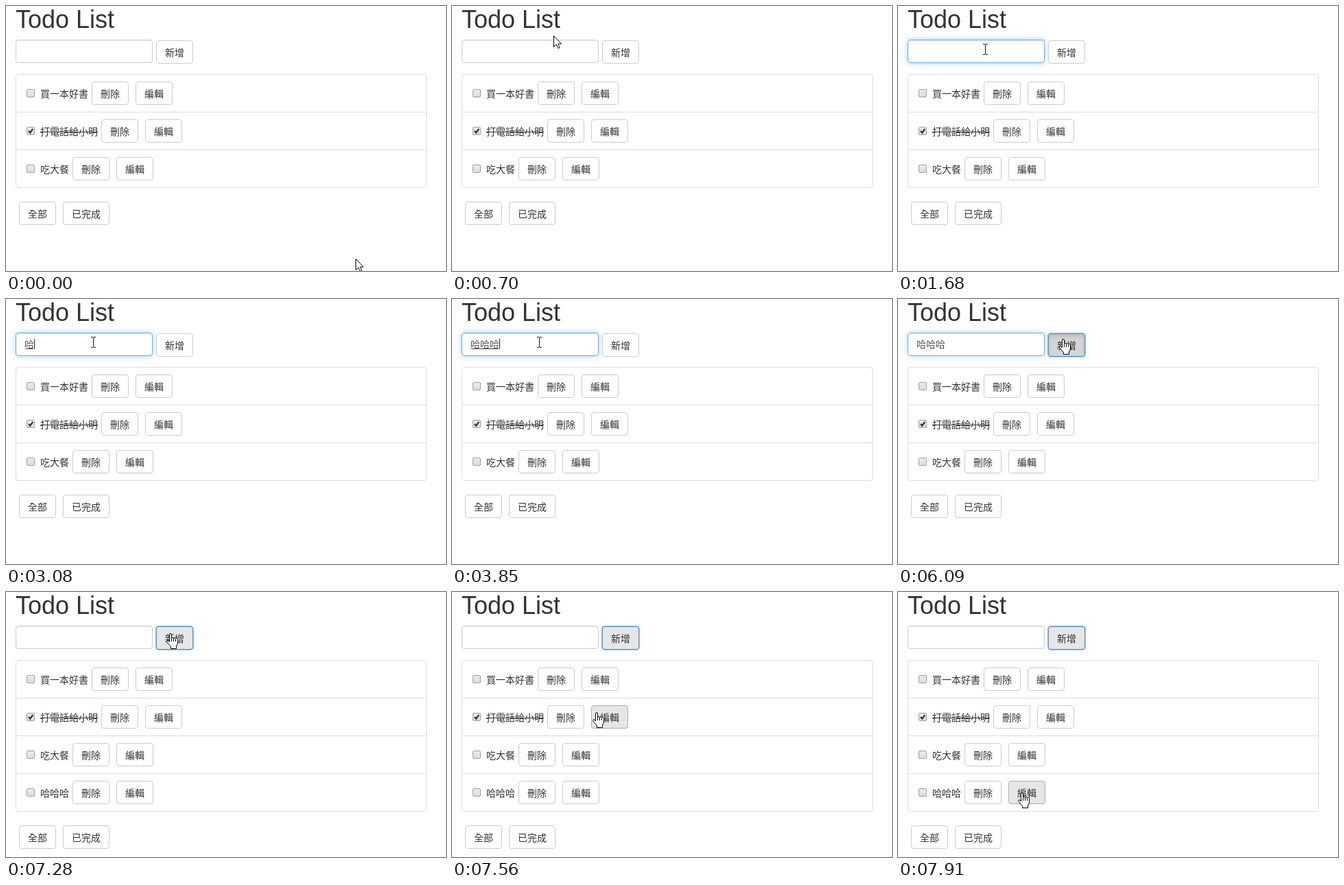
Recreate the animation shown at these times as an HTML page. Size 642x386 px, loop 8000 ms.

```html
<!DOCTYPE html>
<html lang="zh-Hant">
<head>
<meta charset="utf-8">
<title>Todo List</title>
<style>
* { box-sizing: border-box; }
html, body { margin: 0; width: 100%; height: 100%; overflow: hidden; background: #fff; }
body { position: relative; color: #333; font: 300 14px/20px "Noto Sans CJK TC", "Noto Sans CJK", "Noto Sans CJK JP", sans-serif; }
body *, body svg { position: absolute; white-space: nowrap; }
svg * { position: static; }
h1 { left: 14px; top: -1px; margin: 0; font: 36px/41px "Liberation Sans", Arial, sans-serif; }
.field { left: 14px; top: 49px; width: 200px; height: 34px; border: 1px solid #ccc; border-radius: 4px; background: #fff; }
.typed { left: 27px; top: 55px; color: #555; }
.underline { left: 28px; top: 72px; height: 1px; background: #444; }
.caret { top: 58px; width: 1px; height: 15px; background: #222; }
.reading { top: 73px; width: 19px; height: 53px; padding: 1px 2px; border: 1px solid #888; background: #fff; color: #222; line-height: 16px; white-space: pre-line; }
.btn { height: 34px; padding: 6px 12px; border: 1px solid #ccc; border-radius: 4px; background: #fff; }
.hover { background: #e6e6e6; border-color: #adadad; }
.focus { background: #e6e6e6; border-color: #5f94d6; box-shadow: 0 0 0 1px rgba(94, 150, 225, .65); }
.press { background: #d4d4d4; box-shadow: 0 0 0 1px rgba(94, 150, 225, .65), inset 0 3px 5px rgba(0, 0, 0, .125); }
.list { left: 14px; top: 99px; width: 600px; border: 1px solid #ddd; border-radius: 4px; }
.rule { left: 14px; width: 600px; height: 1px; background: #ddd; }
.check { left: 30px; width: 12px; height: 12px; border: 1px solid #a39ca1; border-radius: 2px; background: linear-gradient(#ececec, #dcdcdc); }
.check svg { left: -1px; top: -1px; }
.label { left: 50px; }
.done::after { content: ""; position: absolute; left: 0; right: 0; top: 11px; height: 1px; background: #333; }
.pointer { left: 0; top: 0; overflow: visible; }
.pointer path { fill: #fff; stroke: #000; stroke-linejoin: round; }
#beam path { fill: none; stroke: #111; }
</style>
</head>
<body>
<h1>Todo List</h1>
<div class="field"></div>
<div class="typed"></div>
<div class="underline"></div>
<div class="caret"></div>
<div class="list"></div>
<div class="reading"></div>

<svg class="pointer" id="arrow" width="12" height="20"><path d="M.5 .5V16.5L4.2 13L6.8 18.6L9.2 17.6L6.7 12.1H11.6Z"/></svg>
<svg class="pointer" id="beam" width="7" height="16"><path d="M0 .5H3M4 .5H7M3.5 1V15M0 15.5H3M4 15.5H7"/></svg>
<svg class="pointer" id="hand" width="18" height="23"><path d="M4.5 13V2a1.5 1.5 0 0 1 3 0V7.5a1.5 1.3 0 0 1 3 .3a1.5 1.3 0 0 1 3 .7a1.5 1.3 0 0 1 3 1V15L14.5 19V22.5H6.5V19.5L1 13.3a1.5 1.5 0 0 1 2-2.2Z"/><path d="M7.5 7.5V12M10.5 8V12M13.5 9V12"/></svg>

<script>
const LOOP = 8000, STEP = 70;
const $ = s => document.querySelector(s);
const field = $('.field'), typed = $('.typed'), underline = $('.underline');
const caret = $('.caret'), list = $('.list'), reading = $('.reading');
const pointers = { arrow: [0, 0], beam: [3, 8], hand: [6, 0] };
const buttons = [];

function add(cls, x, y, text = '') {
  const el = document.createElement('div');
  el.className = cls;
  if (x !== null) el.style.left = x + 'px';
  el.style.top = y + 'px';
  el.textContent = text;
  document.body.insertBefore(el, reading);
  return el;
}

function button(x, y, text) {
  const b = { el: add('btn', x, y, text), x, y, w: 26 + 14 * text.length };
  b.el.style.width = b.w + 'px';
  buttons.push(b);
  return b;
}

function addRow(text, i, done) {
  const y = 99 + 55 * i, x = 55 + 14 * text.length;
  const box = add('check', null, y + 22);
  if (done) box.innerHTML = '<svg width="12" height="12"><path d="M3 6L5.2 8.6L9.2 3" fill="none" stroke="#333" stroke-width="2.2"/></svg>';
  const parts = [box, add(done ? 'label done' : 'label', null, y + 18, text)];
  if (i) parts.push(add('rule', null, y));
  const pair = [button(x, y + 11, '刪除'), button(x + 64, y + 11, '編輯')];
  return { parts: parts.concat(pair.map(b => b.el)), pair };
}

const submit = button(219, 50, '新增');
addRow('買一本好書', 0);
addRow('打電話給小明', 1, true);
addRow('吃大餐', 2);
const extra = addRow('哈哈哈', 3);
const filters = [button(19, 285, '全部'), button(83, 285, '已完成')];

// pointer path: time, x, y
const path = [
  [0, 510, 368], [770, 145, 41], [840, 138, 52], [1050, 127, 63],
  [4830, 127, 63], [4900, 128, 63], [5180, 128, 63], [5250, 134, 63],
  [5320, 168, 59], [5390, 212, 58], [5460, 241, 58], [7210, 241, 58], [7910, 181, 292]
];
// each syllable: first key, second key, reading closed, character set
const syllables = [[2730, 2800, 3010, 3080], [3220, 3290, 3430, 3500], [3640, 3710, 3850, 3850]];
const caretFlips = [1190, 1680, 2100, 2590, 2730, 4760, 5250, 5670];
const PRESS = 6090, ADDED = 6230;

const clamp = v => Math.max(0, Math.min(1, v));
const ease = p => p < .5 ? Math.pow(2 * p, 2.5) / 2 : 1 - Math.pow(2 - 2 * p, 2.5) / 2;
const smooth = p => p * p * (3 - 2 * p);
const show = (el, on) => { el.style.visibility = on ? 'visible' : 'hidden'; };

function pointerAt(t) {
  const i = path.findIndex(k => k[0] > t);
  if (i < 0) return path[path.length - 1].slice(1);
  const [t0, x0, y0] = path[i - 1], [t1, x1, y1] = path[i];
  const p = ease((t - t0) / (t1 - t0));
  return [Math.round(x0 + (x1 - x0) * p), Math.round(y0 + (y1 - y0) * p)];
}

const inside = (x, y, b, h = 34) => x >= b.x && x < b.x + b.w && y >= b.y && y < b.y + h;

function drawField(t) {
  const glow = t < PRESS ? smooth(clamp((t - 1170) / 150)) : 1 - smooth(clamp((t - 6060) / 150));
  const mix = (a, b) => Math.round(a + (b - a) * glow);
  field.style.borderColor = `rgb(${mix(204, 102)},${mix(204, 175)},${mix(204, 233)})`;
  field.style.boxShadow = `inset 0 1px 1px rgba(0,0,0,.075), 0 0 8px rgba(102,175,233,${.6 * glow})`;

  const n = syllables.filter(s => t >= s[3]).length;
  typed.textContent = t < ADDED ? '哈'.repeat(n) : '';
  underline.style.width = Math.max(0, 14 * n - 2) + 'px';
  show(underline, n && t < 4270);
  caret.style.left = 27 + 14 * n + 'px';
  show(caret, caretFlips.filter(f => t >= f).length % 2);

  const i = syllables.findIndex(s => t >= s[0] && t < s[2]);
  show(reading, i >= 0);
  if (i >= 0) {
    reading.style.left = 27 + 14 * i + 'px';
    reading.textContent = t < syllables[i][1] ? 'ㄏ' : 'ㄏ\nㄚ';
  }
}

function drawList(t) {
  const added = t >= ADDED;
  list.style.height = (added ? 221 : 166) + 'px';
  extra.parts.forEach(el => show(el, added));
  filters.forEach(b => {
    b.y = added ? 340 : 285;
    b.el.style.top = b.y + 'px';
  });
}

function drawPointer(t) {
  const [x, y] = pointerAt(t);
  let kind = inside(x, y, { x: 14, y: 49, w: 200 }) ? 'beam' : 'arrow';
  for (const b of buttons) {
    const over = inside(x, y, b) && (t >= ADDED || !extra.pair.includes(b));
    if (over) kind = 'hand';
    let cls = over ? 'btn hover' : 'btn';
    if (b === submit && t >= PRESS) cls = t < ADDED ? 'btn focus press' : 'btn focus';
    b.el.className = cls;
  }
  for (const id in pointers) {
    const el = document.getElementById(id), [dx, dy] = pointers[id];
    show(el, id === kind);
    el.style.transform = `translate(${x - dx}px,${y - dy}px)`;
  }
}

function draw(now) {
  const t = Math.floor(now % LOOP / STEP) * STEP;
  drawField(t);
  drawList(t);
  drawPointer(t);
}

const start = performance.now();
function tick() {
  draw(performance.now() - start);
  requestAnimationFrame(tick);
}
tick();
</script>
</body>
</html>
```
